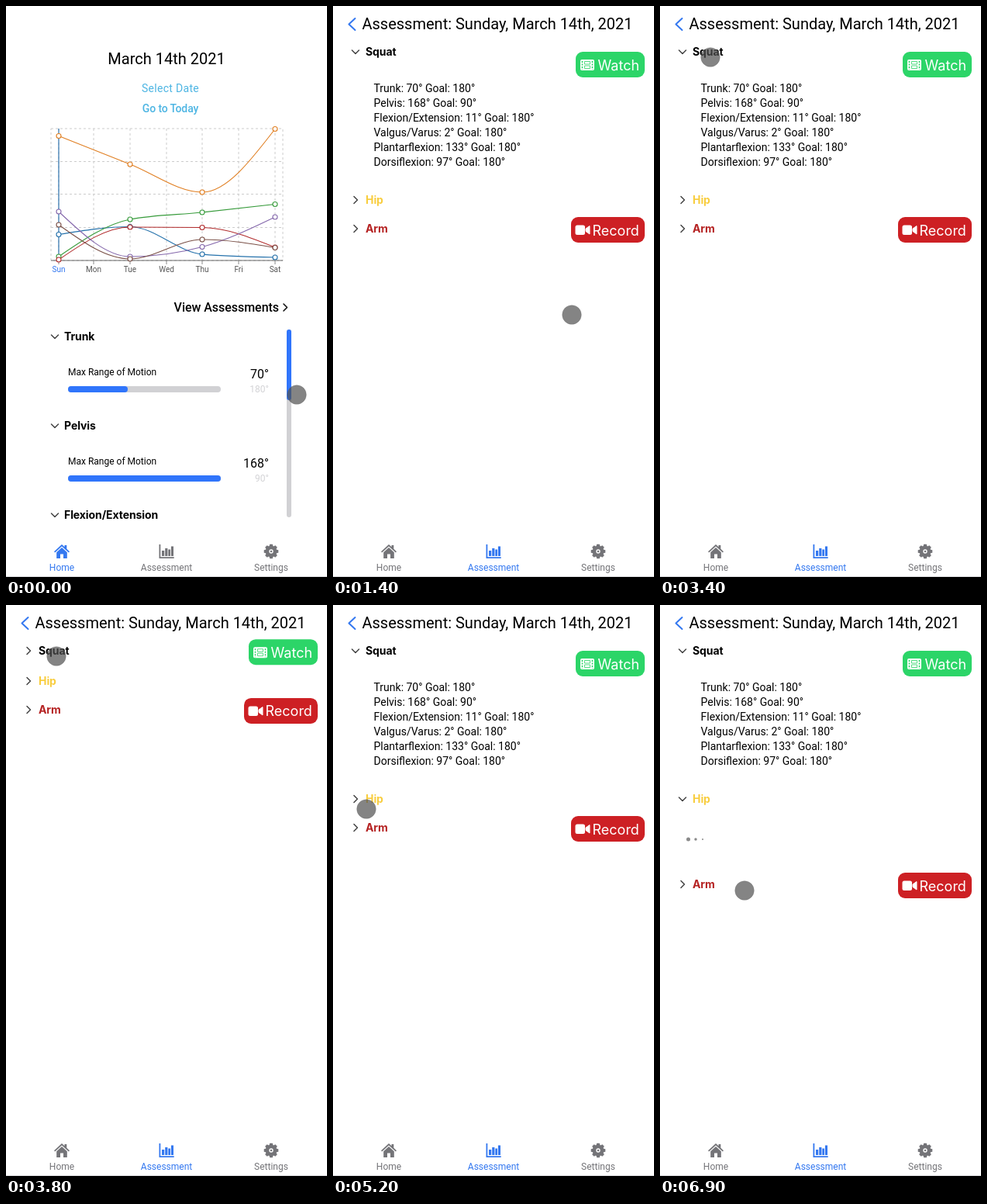
Recreate the animation shown at these times as an HTML page. Size 414 by 736 pixels, loop 7 s.

```html
<!DOCTYPE html>
<html lang="en">
<head>
<meta charset="utf-8">
<title>Motion assessment</title>
<style>
html, body { margin: 0; width: 100%; height: 100%; overflow: hidden; background: #fff; }
svg { display: block; width: 414px; height: 736px; font-family: Roboto, sans-serif; }
.mid { text-anchor: middle; }
.end { text-anchor: end; }
.h { font: 700 14px Inter, sans-serif; letter-spacing: -.08px; }
.btn { font: 400 18px Inter, sans-serif; fill: #fff; }
.line { fill: none; stroke-linecap: round; stroke-linejoin: round; }
.chev { stroke: #444; stroke-width: 1.5; }
.tab { fill: #747478; color: #747478; font-size: 12px; }
.tab.on { fill: #3478f0; color: #3478f0; }
.grid { stroke: #ccc; stroke-dasharray: 3 3; fill: none; }
</style>
</head>
<body>
<svg viewBox="0 0 414 736">
  <defs>
    <path id="down" class="line chev" d="M-4.5-2 0 2.5 4.5-2"/>
    <path id="right" class="line chev" d="M-2-4.5 2.5 0-2 4.5"/>
    <clipPath id="squatClip"><rect id="squatBox" x="40" y="78" width="260" height="157"/></clipPath>
    <clipPath id="hipClip"><rect id="hipBox" x="20" y="266" width="200" height="0"/></clipPath>
    <clipPath id="listClip"><rect x="40" y="405" width="340" height="263"/></clipPath>
  </defs>

  <g id="home">
    <text class="mid" x="207" y="75" font-size="20">March 14th 2021</text>
    <g class="mid" fill="#4db5e3" font-size="14">
      <text x="212" y="111" letter-spacing=".3">Select Date</text>
      <text x="212" y="137" letter-spacing="-.12" font-weight="500">Go to Today</text>
    </g>
    <g id="chart"></g>
    <text class="end" x="352" y="394" font-size="16" font-weight="500" letter-spacing="-.05">View Assessments</text>
    <path class="line" d="M358 384l4.500 4.500-4.500 4.500" stroke="#111" stroke-width="1.600"/>
    <g id="list" clip-path="url(#listClip)"></g>
    <rect x="362" y="417" width="6" height="242" rx="3" fill="#d1d1d4"/>
    <rect x="362" y="417" width="6" height="91" rx="3" fill="#3075fb"/>
  </g>

  <g id="assess">
    <path class="line" d="M28.500 16 20.500 23.500 28.500 31" stroke="#3478f0" stroke-width="2"/>
    <text x="37.500" y="30" font-size="20">Assessment: Sunday, March 14th, 2021</text>
    <use id="squatChev" x="29" y="59"/>
    <text class="h" x="42" y="64">Squat</text>
    <g id="goals" clip-path="url(#squatClip)" font-size="14"></g>
    <g id="watch">
      <rect x="313" width="89" height="33" rx="9" fill="#2cd568"/>
      <rect x="319" y="10" width="18" height="14" rx="2" fill="#fff"/>
      <path d="M321.500 12v11M334.500 12v11" stroke="#2cd568" stroke-width="1.600" stroke-dasharray="2 1.500"/>
      <path d="M324.500 12.500h7v3.500h-7zM324.500 18h7v3.500h-7z" fill="none" stroke="#2cd568" stroke-width=".8"/>
      <text class="btn" x="341.500" y="23.500">Watch</text>
    </g>
    <g id="hip">
      <use id="hipChev" x="29"/>
      <text class="h" x="42" y="5" fill="#f8cd3f">Hip</text>
    </g>
    <g id="dots" clip-path="url(#hipClip)" fill="#8a8a8a"></g>
    <g id="arm">
      <use href="#right" x="29"/>
      <text class="h" x="42" y="5" fill="#b52222">Arm</text>
      <g transform="translate(0 -15)">
        <rect x="307" width="95" height="33" rx="9" fill="#cd2024"/>
        <rect x="312.500" y="10.500" width="12.500" height="12.500" rx="2.500" fill="#fff"/>
        <path d="M326 15l5-3.500v10.500l-5-3.500z" fill="#fff" stroke="#fff" stroke-linejoin="round"/>
        <text class="btn" x="334.500" y="23.500">Record</text>
      </g>
    </g>
  </g>

  <g id="tabHome" class="tab" transform="translate(72 703)">
    <path d="M-10 .3 0-9 3.500-5.700V-8H6.300V-3.200L10 .3 8.800 1.600 0-6.500-8.800 1.600z"/>
    <path d="M-6.800 1.300 0-5 6.800 1.300V9H2V3.500H-2V9H-6.800z"/>
    <text class="mid" y="25">Home</text>
  </g>
  <g id="tabAssess" class="tab" transform="translate(207 703)">
    <path d="M-9.500-9h1.800V7.200H9.700V9H-9.500zM-6-1h3.200V6H-6zM-1.800-4H1.400V6H-1.800zM2.300-2.500H5V6H2.300zM5.900-6.500H9V6H5.900z"/>
    <text class="mid" y="25">Assessment</text>
  </g>
  <g class="tab" transform="translate(342 703)">
    <g id="teeth"></g>
    <circle r="5" fill="none" stroke="currentColor" stroke-width="4.600"/>
    <circle r="1.300"/>
    <text class="mid" y="25">Settings</text>
  </g>
  <path d="M0 735.500H414" stroke="#d8d8da"/>
  <circle id="touch" r="12.300" fill="#505050" fill-opacity=".7" stroke="#666" stroke-opacity=".4" stroke-width=".8"/>
</svg>

<script>
const $ = id => document.getElementById(id);
const put = (id, html) => $(id).insertAdjacentHTML('beforeend', html);
const shift = (id, y) => $(id).setAttribute('transform', `translate(0 ${y})`);

// Chart
const days = ['Sun', 'Mon', 'Tue', 'Wed', 'Thu', 'Fri', 'Sat'];
const dayX = [68, 113, 160, 207, 253, 300, 347];
const xs = [68, 160, 253, 347];
const series = [
  ['#2471ab', 294.5, 284.5, 320, 324],
  ['#e07f22', 167.5, 204, 240, 158.5],
  ['#379b3b', 323, 275, 266, 255.5],
  ['#b12a2b', 327, 285, 285.5, 311],
  ['#8568ac', 265, 323, 310.5, 272],
  ['#7b5148', 282, 326, 301, 311.5]
];

// Monotone cubic through the points
function curve(ys) {
  const h = i => xs[i + 1] - xs[i], s = i => (ys[i + 1] - ys[i]) / h(i);
  const m = [0, 0, 0, 0];
  for (const i of [1, 2]) {
    const a = s(i - 1), b = s(i), p = (a * h(i) + b * h(i - 1)) / (h(i) + h(i - 1));
    m[i] = (Math.sign(a) + Math.sign(b)) * Math.min(Math.abs(a), Math.abs(b), Math.abs(p) / 2);
  }
  m[0] = (3 * s(0) - m[1]) / 2;
  m[3] = (3 * s(2) - m[2]) / 2;
  let d = `M${xs[0]} ${ys[0]}`;
  for (let i = 0; i < 3; i++) {
    const k = h(i) / 3;
    d += `C${xs[i] + k} ${ys[i] + k * m[i]} ${xs[i + 1] - k} ${ys[i + 1] - k * m[i + 1]} ${xs[i + 1]} ${ys[i + 1]}`;
  }
  return d;
}

put('chart',
  '<path class="grid" d="M58 158H357V328H58zM58 200.500H357M58 242.500H357M58 285.500H357"/>' +
  dayX.map((x, i) => `<path class="grid" d="M${x} 158V328"/><path d="M${x} 328v5" stroke="#888"/>
    <text class="mid" x="${x}" y="343" font-size="10" fill="${i ? '#555' : '#3478f0'}">${days[i]}</text>`).join('') +
  '<path d="M58 328H357" stroke="#666"/><path d="M68 158V328" stroke="#3f7fb5" stroke-width="1.300"/>' +
  series.map(([c, ...ys]) => `<path d="${curve(ys)}" fill="none" stroke="${c}" stroke-width="1.100"/>`).join('') +
  series.map(([c, ...ys]) => ys.map((y, i) =>
    `<circle cx="${xs[i]}" cy="${y}" r="3" fill="#fff" stroke="${c}" stroke-width="1.100"/>`).join('')).join(''));

// Joint list
[['Trunk', 70, 180, 77], ['Pelvis', 168, 90, 197], ['Flexion/Extension', 11, 180, 12]].forEach(([name, max, goal, w], i) =>
  put('list', `<g transform="translate(0 ${426 + 115 * i})">
    <use href="#down" x="63"/><text class="h" x="75" y="5">${name}</text>
    <text x="80" y="50" font-size="12">Max Range of Motion</text>
    <text class="end" x="339" y="54" font-size="16">${max}°</text>
    <text class="end" x="339" y="72" font-size="12" fill="#d3d3d6">${goal}°</text>
    <rect x="80" y="64" width="197" height="8" rx="4" fill="#d1d1d4"/>
    <rect x="80" y="64" width="${w}" height="8" rx="4" fill="#3075fb"/></g>`));

put('goals', [['Trunk', 70, 180], ['Pelvis', 168, 90], ['Flexion/Extension', 11, 180], ['Valgus/Varus', 2, 180],
  ['Plantarflexion', 133, 180], ['Dorsiflexion', 97, 180]].map(([name, max, goal], i) =>
  `<text x="52.500" y="${111 + 19 * i}">${name}: ${max}° Goal: ${goal}°</text>`).join(''));

put('dots', [36.5, 46, 55].map(x => `<circle cx="${x}" cy="302"/>`).join(''));
for (let a = 0; a < 360; a += 45)
  put('teeth', `<path d="M-2.600-6-1.800-9.300H1.800L2.600-6z" transform="rotate(${a})"/>`);

// Timeline
const LOOP = 7000, STEP = 100;
const NAVIGATE = 1000, CLOSE = 3570, REOPEN = 4444, OPEN_HIP = 5773;
const path = [
  [0, 375, 501], [300, 345, 455], [700, 308, 398], [1600, 308, 398], [2000, 195, 250],
  [2400, 81, 118], [2600, 75, 100], [3100, 65, 66], [4300, 65, 66], [4600, 55, 91],
  [4900, 29, 180], [5200, 43, 263], [5500, 59, 252], [6000, 59, 252], [6500, 95, 325], [6900, 109, 368]
];

function touchAt(t) {
  const i = Math.max(1, path.findIndex(p => p[0] >= t));
  const [t0, x0, y0] = path[i - 1], [t1, x1, y1] = path[i];
  const k = (t - t0) / (t1 - t0);
  return [x0 + (x1 - x0) * k, y0 + (y1 - y0) * k];
}

const easeOut = (t, from) => 1 - (1 - Math.min(1, Math.max(0, (t - from) / 300))) ** 3;

function draw(t) {
  const inside = t >= NAVIGATE;
  $('home').style.display = inside ? 'none' : '';
  $('assess').style.display = inside ? '' : 'none';
  $('tabHome').classList.toggle('on', !inside);
  $('tabAssess').classList.toggle('on', inside);

  const squat = t < REOPEN ? 1 - easeOut(t, CLOSE) : easeOut(t, REOPEN);
  const hipOpen = easeOut(t, OPEN_HIP);
  const hipY = 96 + 154 * squat, armY = hipY + 37 + 73 * hipOpen;
  shift('watch', 44 + 15 * squat);
  shift('hip', hipY);
  shift('arm', armY);
  $('squatBox').setAttribute('height', Math.max(0, hipY - 96));
  $('hipBox').setAttribute('height', Math.max(0, armY - 287));
  $('squatChev').setAttribute('href', t >= CLOSE && t < REOPEN ? '#right' : '#down');
  $('hipChev').setAttribute('href', t >= OPEN_HIP ? '#down' : '#right');

  [...$('dots').children].forEach((dot, i) => {
    const s = .5 + .5 * Math.cos(Math.PI * 2 * (t - 6900) * 3 / 2000 - i * Math.PI / 2);
    dot.setAttribute('r', 1 + 1.5 * s);
  });

  const [x, y] = touchAt(t);
  $('touch').setAttribute('cx', x);
  $('touch').setAttribute('cy', y);
}

const start = performance.now();
function tick() {
  const t = (performance.now() - start + 15) % LOOP;
  draw(Math.floor(t / STEP) * STEP);
  requestAnimationFrame(tick);
}
tick();
</script>
</body>
</html>
```
